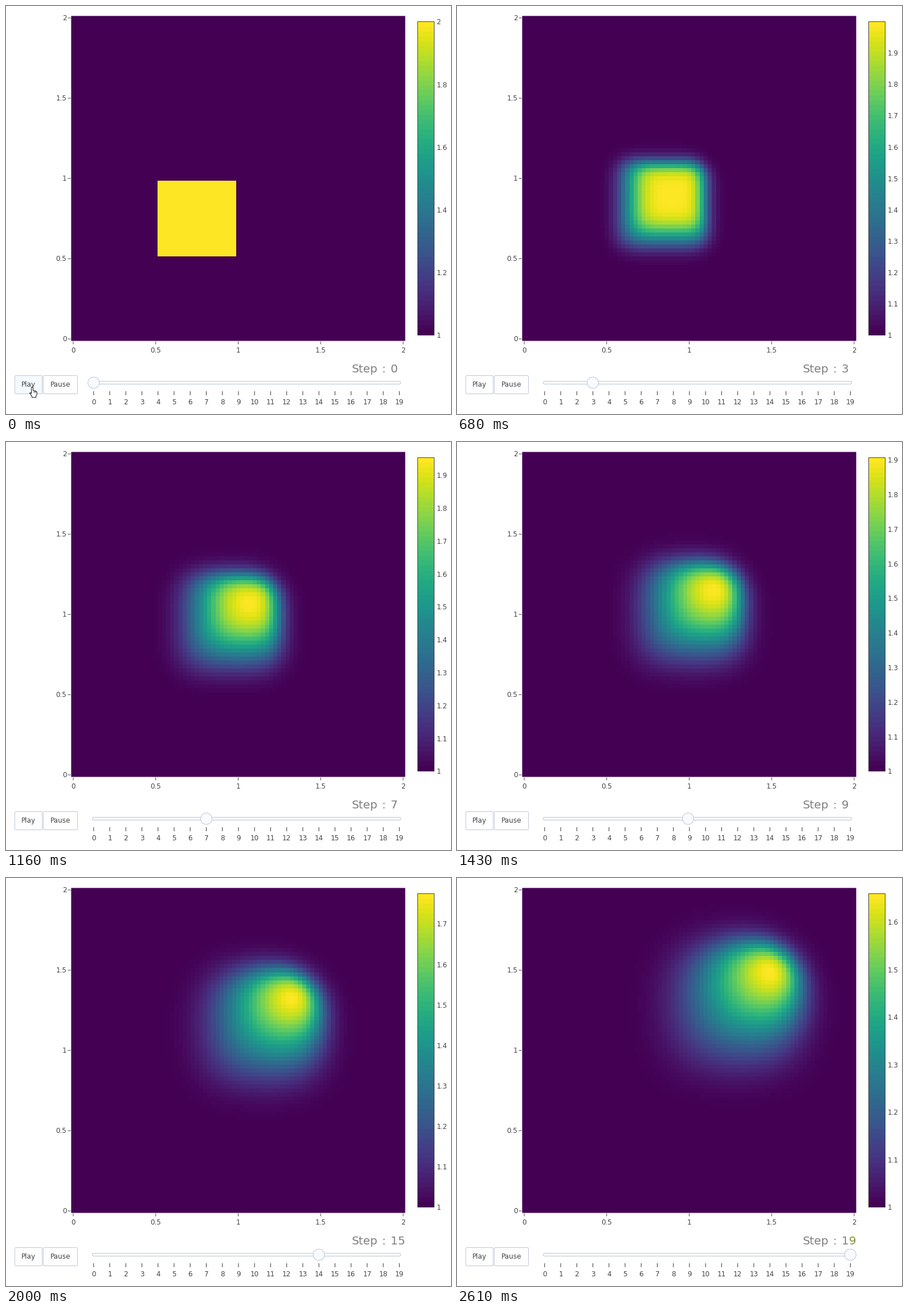
A matplotlib script for the animation above (3340 ms loop, 781 px wide and 717 px high).

```python
import numpy as np
import matplotlib.pyplot as plt
from matplotlib.animation import FuncAnimation
from matplotlib.patches import Circle, FancyBboxPatch, Polygon, Rectangle

W, H, DPI = 781, 717, 64
LOOP, INTERVAL = 3340, 20
PX = 72 / DPI                      # points per pixel
INK, EDGE, PALE = "#444444", "#bec8d9", "#f8faff"

# Viscous Burgers flow of a square pulse, upwind on an 81 x 81 grid
N, STEPS, SUBSTEPS = 81, 20, 10
DX, DT, NU = 2 / (N - 1), 0.0025, 0.01


def simulate():
    u = np.ones((N, N))
    u[21:40, 21:40] = 2
    fields = [u.copy()]
    for _ in range((STEPS - 1) * SUBSTEPS):
        c = u[1:-1, 1:-1]
        west, east = u[1:-1, :-2], u[1:-1, 2:]
        south, north = u[:-2, 1:-1], u[2:, 1:-1]
        advect = c * (2 * c - west - south) / DX
        diffuse = NU * (west + east + south + north - 4 * c) / DX**2
        u[1:-1, 1:-1] = c + DT * (diffuse - advect)
        fields.append(u.copy())
    return fields[::SUBSTEPS]


FIELDS = simulate()

plt.rcParams.update({"font.family": "DejaVu Sans", "path.snap": False})
fig = plt.figure(figsize=(W / DPI, H / DPI), dpi=DPI, facecolor="white")
ax = fig.add_axes([0, 0, 1, 1])
ax.set_xlim(0, W)
ax.set_ylim(H, 0)
ax.axis("off")


def label(x, y, s, size=12, ha="center", color=INK):
    return ax.text(x, y + 0.365 * size, s, fontsize=size * PX, ha=ha,
                   va="baseline", color=color)


def line(x0, y0, x1, y1, color=INK):
    ax.plot([x0, x1], [y0, y1], color=color, lw=PX, solid_capstyle="butt")


def box(x, y, w, h, fill):
    patch = FancyBboxPatch((x, y), w, h, boxstyle="round,pad=0,rounding_size=2",
                           fc=fill, ec=EDGE, lw=PX)
    return ax.add_patch(patch)


def picture(data, left, right, bottom, top):
    return ax.imshow(data, cmap="viridis", origin="lower", aspect="auto",
                     interpolation="nearest", extent=[left, right, bottom, top])


def axis_x(v):
    return 118 + 289.5 * v


def axis_y(v):
    return 585 - 282 * v


# Heat map with its axes; a plain backing softens the outer pixel edge
half = DX / 2
left, right = axis_x(-half), axis_x(2 + half)
bottom, top = axis_y(-half), axis_y(2 + half)
ax.add_patch(Rectangle((left, top), right - left, bottom - top,
                       fc=plt.cm.viridis(0), ec="none", zorder=-1))
heat = picture(FIELDS[0], left, right, bottom, top)
heat.set_clip_path(Rectangle((115, 18), 585, 570, transform=ax.transData))
for v in (0, 0.5, 1, 1.5, 2):
    line(axis_x(v), 589.5, axis_x(v), 594.5)
    label(axis_x(v), 605, f"{v:g}")
    line(108.5, axis_y(v), 113.5, axis_y(v))
    label(106.5, axis_y(v), f"{v:g}", ha="right")

# Colour bar
BAR_TOP, BAR_BOTTOM = 27.5, 578.5
picture(np.linspace(0, 1, 64)[:, None], 723, 751, 578, 28)
ax.add_patch(Rectangle((722.5, BAR_TOP), 29, BAR_BOTTOM - BAR_TOP,
                       fc="none", ec=INK, lw=PX))
bar_labels = [label(755.5, 0, "", ha="left") for _ in range(11)]

# Buttons
play = box(15.5, 649.5, 48, 32, "white")
box(65.5, 649.5, 60, 32, "white")
label(39.2, 664.5, "Play")
label(95.3, 664.5, "Pause")

# Slider
SLIDE_X, SLIDE_GAP = 153.8, 28.24
box(151.5, 659.5, 541, 5, PALE)
for k in range(STEPS):
    x = SLIDE_X + SLIDE_GAP * k
    line(x, 677, x, 684, "#333333")
    label(x, 695.5, str(k))
grip = ax.add_patch(Circle((SLIDE_X, 662), 10, fc=PALE, ec=EDGE, lw=PX, zorder=5))

# Step counter
GREY = "#808080"
TINTS = {2: "#7cc47c", 5: "#5f8789", 19: "#7f9440"}
label(606.3, 637, "Step", 20, "left", GREY)
label(660, 637, ":", 20, "left", GREY)
digits = [label(x, 637, "", 20, "left", GREY) for x in (674.6, 687.3)]

# Pointing hand
hand = [
    ax.add_patch(Polygon(
        [(44.6, 670.2), (45.8, 669.4), (47.2, 670.2), (47.5, 675.8),
         (52.5, 676.8), (54.3, 678.4), (54.3, 682.5), (52.6, 685.2),
         (52.4, 688), (45.8, 688), (45.4, 685.6), (41.6, 680.6),
         (42.4, 679.4), (44.6, 681.2)],
        fc="white", ec="#111111", lw=PX, joinstyle="round", zorder=6))]
for x in (49.6, 51.9):
    hand += ax.plot([x, x], [676.6, 679.6], color="#111111", lw=0.8 * PX, zorder=7)

ax.set_xlim(0, W)
ax.set_ylim(H, 0)

# Screen refreshes at which some steps begin; the others lie evenly between
START, REFRESH = 130, 68.9
KEY_STEPS = [0, 2, 5, 7, 13, 16, 19]
KEY_TICKS = [1.4, 4.9, 10.1, 13.4, 23.9, 28.4, 34.2]
BEGIN = np.interp(range(STEPS), KEY_STEPS, KEY_TICKS)
GLIDE, REDRAW_LAG = 1.52, 0.5


def ease(p):
    return 4 * p**3 if p < 0.5 else 1 - 4 * (1 - p)**3


def step_at(tick):
    return max(0, int(np.searchsorted(BEGIN, tick, side="right")) - 1)


def show_scale(peak):
    ticks = np.arange(1, 2.01, 0.2 if peak > 2 - 1e-9 else 0.1)
    for i, text in enumerate(bar_labels):
        shown = i < len(ticks) and ticks[i] <= peak + 5e-4
        text.set_visible(shown)
        if shown:
            rise = (ticks[i] - 1) / (peak - 1)
            y = BAR_BOTTOM + 0.5 - rise * (BAR_BOTTOM - BAR_TOP)
            text.set_text(f"{ticks[i]:g}")
            text.set_y(y + 4.4)


def update(i):
    t = (i + 0.5) * INTERVAL
    idle = t < START
    tick = 0 if idle else np.floor((t - START) / REFRESH + 0.1)
    step = step_at(tick)

    field = FIELDS[step_at(tick - REDRAW_LAG)]
    heat.set_data(field)
    heat.set_clim(1, field.max())
    show_scale(field.max())

    glide = np.clip((tick - BEGIN[step]) / GLIDE, 0, 1)
    place = step - 1 + ease(glide) if step else 0
    grip.center = (SLIDE_X + SLIDE_GAP * place, 662)

    number = str(step)
    for j, text in enumerate(digits):
        text.set_text(number[j:j + 1])
        text.set_color(TINTS.get(step, GREY) if j == len(number) - 1 else GREY)

    play.set_facecolor("#f4faff" if idle else "white")
    for part in hand:
        part.set_visible(idle)
    return []


anim = FuncAnimation(fig, update, frames=LOOP // INTERVAL, interval=INTERVAL,
                     init_func=lambda: [], repeat=True, repeat_delay=0)
plt.show()
```
